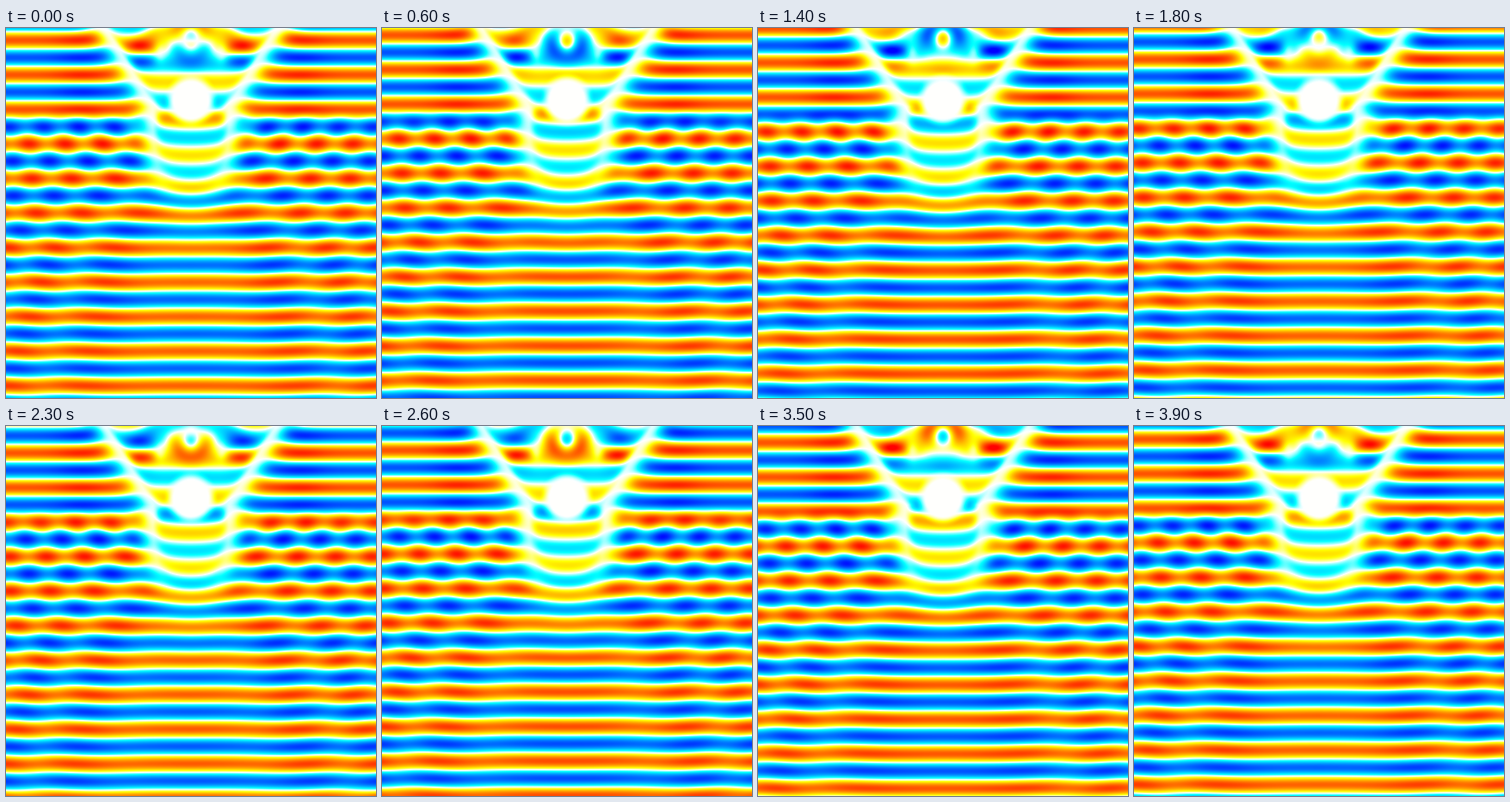
Write a matplotlib script that moves like this. It is 400 px wide and 400 px high and loops after 4000 ms.

```python
import numpy as np
import matplotlib.pyplot as plt
from matplotlib.animation import FuncAnimation
from matplotlib.colors import LinearSegmentedColormap

SIZE = 400
FRAMES = 40
WAVE = 37.35      # wavelength in pixels
CREST = 88        # a crest of the plane wave at time zero
DISC_Y = 78
PEAK = 1.33       # field value at the ends of the colour scale


def bell(d, width):
    return np.exp(-(d / width) ** 2)


def smooth(v, lo, hi):
    s = np.clip((v - lo) / (hi - lo), 0, 1)
    return s * s * (3 - 2 * s)


def turn(cycles):
    return np.exp(2j * np.pi * cycles)


def edge_distance(x, y):
    """Signed distance to the edge of the disturbed region, negative inside."""
    upper = x - np.maximum(93 - 0.6 * y, 42)
    lower = 42 * (np.hypot(x / 42, (y - 105) / 98) - 1)
    return np.where(y < 105, upper, lower)


def outer_envelope(x, y, d):
    """Plane wave with the ripple of the circular scattered wave."""
    above = 1 - smooth(y, 85, 115)
    dy = y - DISC_Y
    r = np.hypot(x, dy) + 1
    side = 0.3 + 0.7 * x / r
    strength = 0.27 * np.minimum((140 / r) ** 0.6, 1.1) * side * (1 - above)
    shift = 5 + 36 * smooth(y, 115, 245)
    ripple = strength * turn((shift - r - dy) / WAVE)
    swell = 0.2 * above * bell(x - 118, 28)
    lead = 4 * above * bell(d, 22)
    return (1 + swell + ripple) * turn(lead / WAVE)


def inner_envelope(x, y):
    """Weak, delayed wave around and behind the disc."""
    lag = np.interp(y, [0, 30, 70, 110, 165, 205], [3, 6, 9, 12.5, 12.5, 6])
    lag = lag * (1 - 0.4 * smooth(y, 80, 110) * np.clip(x / 50, 0, 1) ** 2)
    lag -= 9 * bell(x - 32, 20) * bell(y - 2, 12)
    amp = 0.45 + 0.35 * smooth(y, 145, 195)
    amp += 0.95 * bell(x - 55, 18) * bell(y - 25, 19)
    amp += 0.25 * bell(x, 38) * bell(y - 100, 13)
    amp += 0.25 * bell(x - 30, 10) * bell(y - 92, 12)
    amp += 0.15 * bell(x, 25) * bell(y - 44, 9)
    amp *= 1 - 0.75 * bell(x - 33, 7) * bell(y - 27, 12)
    return amp * turn(-lag / WAVE)


def build_field():
    px = np.arange(SIZE) + 0.5
    gx, y = np.meshgrid(px, px)
    x = np.abs(gx - SIZE / 2)

    d = edge_distance(x, y)
    soft = 4.5 + 4 * smooth(y, 120, 180)
    inside = 1 / (1 + np.exp(np.clip(d / soft, -50, 50)))
    env = ((1 - inside) * outer_envelope(x, y, d)
           + inside * inner_envelope(x, y))

    # pale seam along the edge
    depth = np.interp(y, [0, 105, 150, 185], [0.92, 0.85, 0.55, 0])
    spread = np.where(d > 0, np.interp(y, [0, 105, 185], [15, 17, 9]), 7)
    env = env * (1 - depth * bell(d, spread))

    field = env * turn((y - CREST) / WAVE)

    # ring at the top with an opposite core
    r = np.hypot(x * 1.2, (y - 12.5) * 0.95)
    ring = 1.5 * turn(0.15 + 0.0091 * (y - 3)) * (1 - 1.4 * bell(r, 14))
    mix = np.exp(-(np.hypot(x, y - 12) / 26) ** 4)
    field = field * (1 - mix) + ring * mix

    # still disc
    r = np.hypot(x * 1.05, y - DISC_Y)
    return field * smooth(r, 19, 32)


cmap = LinearSegmentedColormap.from_list("wave", [
    (0.0, "#0000ff"), (0.375, "#00ffff"), (0.5, "#ffffff"),
    (0.625, "#ffff00"), (1.0, "#ff0000")], N=512)

field = build_field()
fig = plt.figure(figsize=(4, 4), dpi=100)
ax = fig.add_axes([0, 0, 1, 1])
ax.axis("off")
image = ax.imshow(field.real, cmap=cmap, vmin=-PEAK, vmax=PEAK,
                  interpolation="nearest", aspect="auto")


def draw(i):
    image.set_data((field * turn(i / FRAMES)).real)
    return [image]


anim = FuncAnimation(fig, draw, frames=FRAMES, interval=100,
                     repeat=True, repeat_delay=0, blit=False)
plt.show()
```
